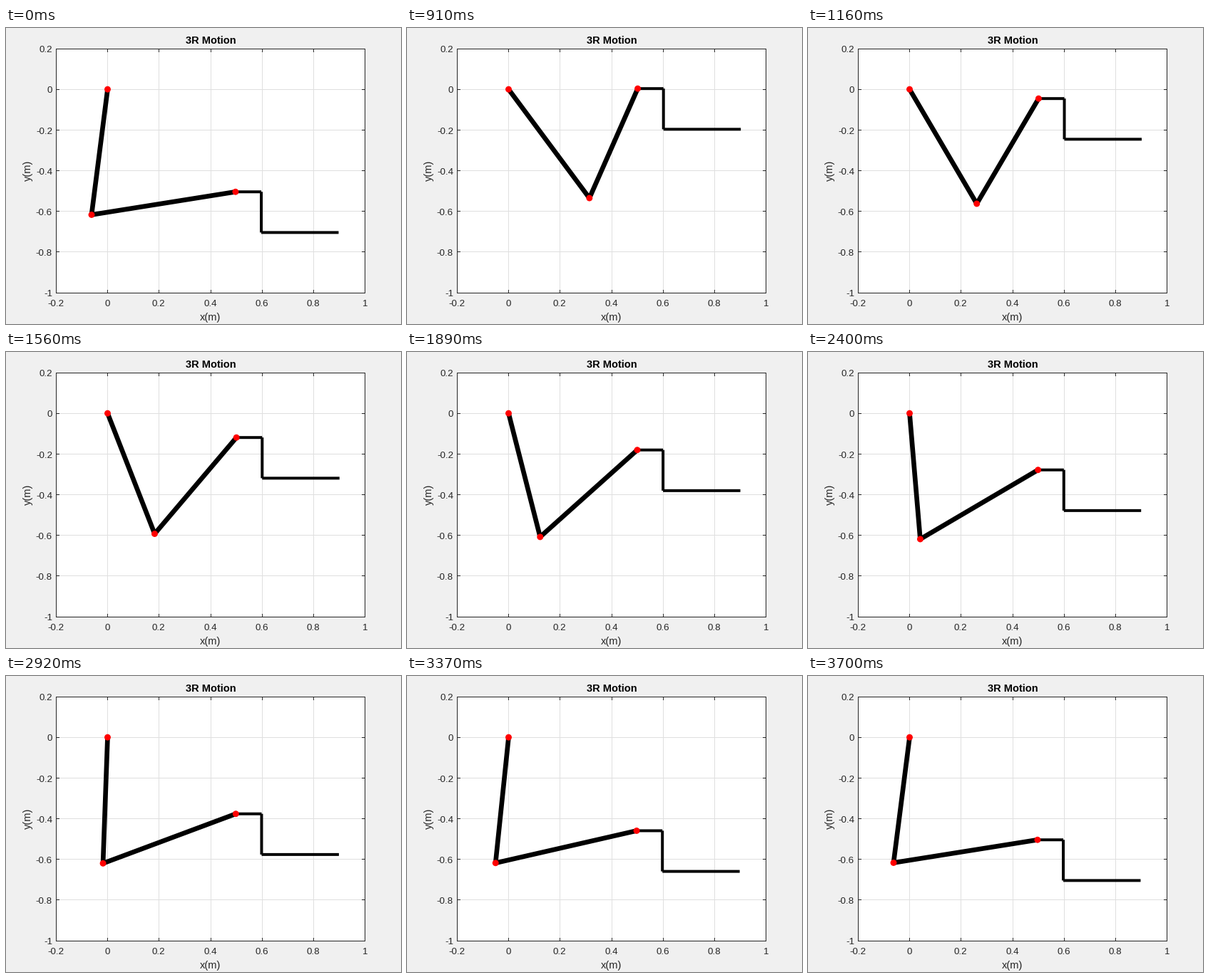
A matplotlib script for the animation above (4.19 s loop, 554 by 416 pixels).

```python
import numpy as np
import matplotlib.pyplot as plt
from matplotlib.animation import FuncAnimation
from matplotlib.patches import Circle

W, H, DPI = 554, 416, 64
PX = 72 / DPI          # one pixel in points
PT = 96 / DPI          # one 96-dpi screen point
LOOP, STEP = 4190, 10
LEFT, RIGHT, TOP, BOTTOM = 70.2, 503.9, 29, 372
TICK = 4
L1, L2 = 0.62, 0.57
LAST = 43
DARK = "#262626"

# Clock (ms) and the number of poses reached by then
CLOCK = [910, 1160, 1420, 1490, 1890, 2010, 2080, 2400,
         2590, 2660, 2920, 3180, 3250, 3370, 3440, 3700]
POSES = [0, 4, 8, 9, 15, 17, 18, 23, 26, 27, 31, 35, 36, 38, 39, LAST]

plt.rcParams["font.family"] = "Liberation Sans"
fig = plt.figure(figsize=(W / DPI, H / DPI), dpi=DPI, facecolor="#f0f0f0")
ax = fig.add_axes([0, 0, 1, 1])
ax.set(xlim=(0, W), ylim=(H, 0))
ax.axis("off")


def px(x):
    return LEFT + (np.asarray(x) + 0.2) / 1.2 * (RIGHT - LEFT)


def py(y):
    return TOP + (0.2 - np.asarray(y)) / 1.2 * (BOTTOM - TOP)


def rule(xs, ys, color):
    """Crisp line, one pixel wide, through pixel centres."""
    ax.plot(np.floor(xs) + 0.5, np.floor(ys) + 0.5, color=color, lw=PX,
            solid_capstyle="projecting", solid_joinstyle="miter", snap=False)


def label(x, y, text, size=10, color=DARK, ha="center", **kw):
    ax.text(x, y, text, size=size * PT, color=color, ha=ha, va="baseline", **kw)


def draw_axes():
    box_x = [LEFT, RIGHT, RIGHT, LEFT, LEFT]
    box_y = [TOP, TOP, BOTTOM, BOTTOM, TOP]
    ax.fill(np.floor(box_x) + 0.5, np.floor(box_y) + 0.5, "w", lw=0)
    xs = [i / 5 for i in range(-1, 6)]
    ys = [i / 5 for i in range(-5, 2)]
    for x in px(xs[1:-1]):
        rule([x, x], [TOP, BOTTOM], "#dfdfdf")
    for y in py(ys[1:-1]):
        rule([LEFT, RIGHT], [y, y], "#dfdfdf")
    rule(box_x, box_y, DARK)
    for v in xs:
        x = px(v)
        rule([x, x], [TOP, TOP + TICK], DARK)
        rule([x, x], [BOTTOM - TICK, BOTTOM], DARK)
        label(x - 0.6, 391, f"{v:g}")
    for v in ys:
        y = py(v)
        rule([LEFT, LEFT + TICK], [y, y], DARK)
        rule([RIGHT - TICK, RIGHT], [y, y], DARK)
        label(65, y + 5.25, f"{v:g}", ha="right")
    label(287, 22, "3R Motion", 11, "black", weight="bold")
    label(286.5, 411, "x(m)", 11)
    label(34.5, 200.5, "y(m)", 11, rotation=90, rotation_mode="anchor")


def wrist(k):
    """Downward sweep at steady speed that brakes over the last poses."""
    y = 0.0035 - 0.01225 * k + 0.0003 * max(0, k - 35) ** 2
    return 0.501 + 0.009 * y, y


def elbow(x, y):
    r = np.hypot(x, y)
    a = np.arctan2(y, x) - np.arccos((L1**2 + r**2 - L2**2) / (2 * L1 * r))
    return L1 * np.cos(a), L1 * np.sin(a)


def bars(n, width):
    return [ax.plot([], [], "k", lw=width * PT, solid_capstyle="butt",
                    snap=False)[0] for _ in range(n)]


draw_axes()
links, tool = bars(2, 5), bars(3, 3)
joints = [ax.add_patch(Circle((0, 0), 4.45, fc="red", lw=0, zorder=3))
          for _ in range(3)]


def chain(lines, pts):
    for line, (a, b) in zip(lines, zip(pts, pts[1:])):
        line.set_data(px([a[0], b[0]]), py([a[1], b[1]]))


def update(i):
    t = i * STEP
    k = LAST if t < CLOCK[0] else int(np.interp(t, CLOCK, POSES) + 1e-6)
    x, y = wrist(k)
    arm = [(0, 0), elbow(x, y), (x, y)]
    chain(links, arm)
    chain(tool, [(x, y), (x + 0.1, y), (x + 0.1, y - 0.2), (x + 0.4, y - 0.2)])
    for dot, (jx, jy) in zip(joints, arm):
        dot.center = px(jx), py(jy)
    return [*links, *tool, *joints]


anim = FuncAnimation(fig, update, frames=LOOP // STEP, interval=STEP,
                     repeat=True, repeat_delay=0, blit=False)
plt.show()
```
